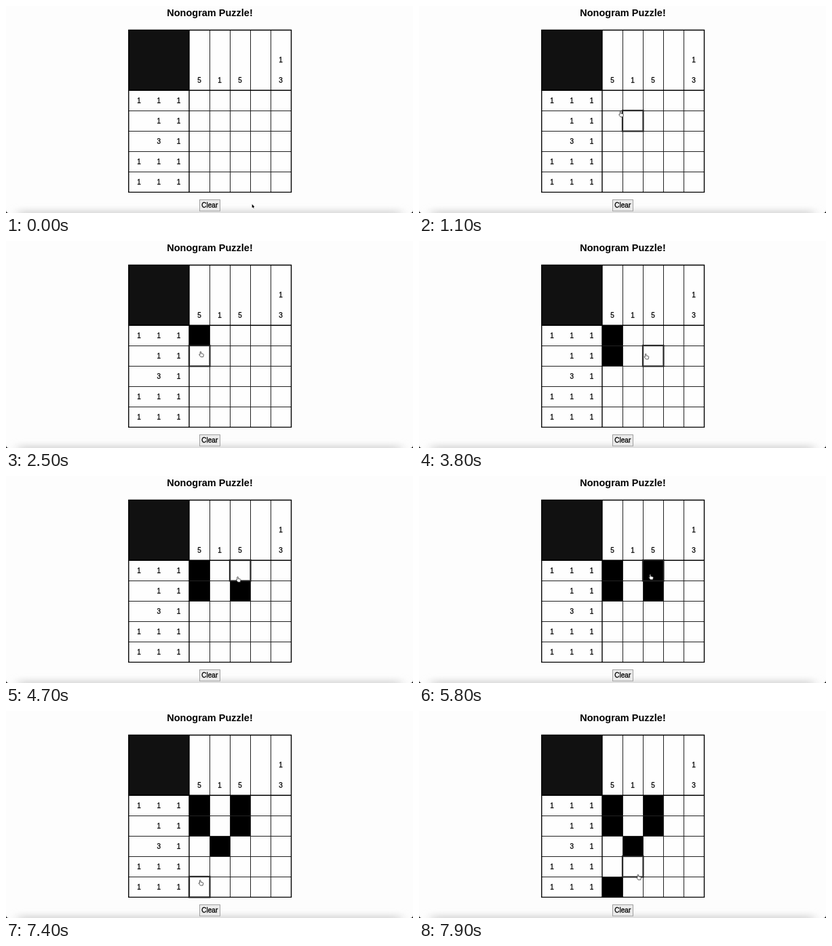
Write an HTML page that moves like this. It is 600 by 305 pixels and loops after 8000 ms.

```html
<!DOCTYPE html>
<html lang="en">
<head>
<meta charset="utf-8">
<title>Nonogram</title>
<style>
  html, body { margin: 0; width: 100%; height: 100%; overflow: hidden; background: #fdfdfd; }
  svg { display: block; }
  text { font: 10px "Liberation Sans", Arial, sans-serif; text-anchor: middle; fill: #000; stroke: #000; stroke-width: .3; }
  .title { font-size: 14.5px; font-weight: bold; stroke: none; }
</style>
</head>
<body>
<svg width="600" height="305" viewBox="0 0 600 305">
  <filter id="blur" x="-10%" y="-100%" width="120%" height="300%"><feGaussianBlur stdDeviation="8 4"/></filter>
  <rect x="18" y="301" width="564" height="30" fill="#d8d8d8" filter="url(#blur)"/>
  <path d="M0 301Q0 305 4 305H0ZM600 301Q600 305 596 305H600Z"/>
  <text class="title" x="300.5" y="14.5">Nonogram Puzzle!</text>
  <rect x="181" y="36" width="239.5" height="238.5" fill="#fefefe"/>
  <rect x="181" y="36" width="89" height="88" fill="#111"/>
  <g id="cells"></g>
  <path id="lines" fill="none" stroke="#222"/>
  <path d="M180.8 35.5H420.5V274.4H180.8ZM270 36V274M181 124.3H420" fill="none" stroke="#000" stroke-width="1.4"/>
  <g id="clues"></g>
  <rect x="285.5" y="285.5" width="30" height="16.5" fill="#ebebeb" stroke="#a0a0a0"/>
  <text x="300.3" y="297.3">Clear</text>
  <g id="hover" fill="none">
    <rect width="30.5" height="30.5" stroke="#000" stroke-opacity=".25" stroke-width="3"/>
    <rect width="30.5" height="30.5" stroke="#222" stroke-width="1.8"/>
  </g>
  <g id="cursor" stroke-linejoin="round">
    <path id="arrow" d="M-1.6 -3V2.2L-.4 1.2L.5 3L1.4 2.6L.6 .9H2.1Z" stroke="#fff" stroke-width=".5" paint-order="stroke"/>
    <path id="hand" d="M-1.9 -3.6q.8 -1 1.6 0V-1.2l2.8 .6q1 .3 .9 1.3L2.7 3.8H-.9L-3.3 .6q0 -1.2 1.4 -.2Z" fill="#fff" stroke="#333" stroke-width=".8"/>
  </g>
</svg>
<script>
const LOOP = 8000, STEP = 100, HOVER_LAG = 60;
const LEFT = 270, TOP = 124, SIZE = 30, COUNT = 5;
const $ = id => document.getElementById(id);

function add(parent, tag, attrs, text = '') {
  const node = document.createElementNS('http://www.w3.org/2000/svg', tag);
  for (const key in attrs) node.setAttribute(key, attrs[key]);
  node.textContent = text;
  return parent.appendChild(node);
}

// Grid and clues
let lines = '';
for (let i = 1; i < COUNT; i++) {
  lines += `M${LEFT + SIZE * i + .5} 36V274M181 ${TOP + SIZE * i + .5}H420`;
}
$('lines').setAttribute('d', lines);

const clue = (x, y, value) => add($('clues'), 'text', { x, y }, value);
['111', ' 11', ' 31', '111', '111'].forEach((row, r) =>
  [...row].forEach((n, i) => clue(196 + 29.3 * i, 143 + SIZE * r, n)));
[...'515 3'].forEach((n, c) => clue(285 + SIZE * c, 112.7, n));
clue(405, 83, 1);

// Pointer moves, each easing out from where the last one ended
const home = { x: 364.3, y: 295 };
const moves = [
  { from: 100, to: 200, x: 372, y: 291 },
  { from: 300, to: 1400, x: 292, y: 149 },
  { from: 2100, to: 2500, x: 288, y: 167 },
  { from: 3400, to: 4100, x: 346, y: 171 },
  { from: 4400, to: 4900, x: 342, y: 149 },
  { from: 5900, to: 6600, x: 303, y: 200 },
  { from: 6900, to: 7600, x: 286, y: 258 },
  { from: 7700, to: 7900, x: 324, y: 245 }
];

function pointerAt(t) {
  let { x, y } = home;
  for (const move of moves) {
    const left = 1 - Math.min(1, Math.max(0, (t - move.from) / (move.to - move.from)));
    const k = 1 - left * left;
    x += (move.x - x) * k;
    y += (move.y - y) * k;
  }
  return { x, y };
}

// The page reacts to the fingertip slightly late
function cellAt(t) {
  const { x, y } = pointerAt(t - HOVER_LAG);
  const c = Math.floor((x - LEFT) / SIZE), r = Math.floor((y - 3 - TOP) / SIZE);
  const inside = Math.min(c, r) >= 0 && Math.max(c, r) < COUNT;
  return { x: LEFT + SIZE * c, y: TOP + SIZE * r, inside };
}

// Each click fills the cell under the pointer
const clicks = [1900, 3500, 4200, 5800, 6800, 7500].map(time => {
  const { x, y } = cellAt(time);
  return { time, node: add($('cells'), 'rect', { x, y, width: SIZE + .5, height: SIZE + .5 }) };
});

const show = (node, on) => node.setAttribute('visibility', on ? 'visible' : 'hidden');
const place = (node, { x, y }) => node.setAttribute('transform', `translate(${x} ${y})`);

function draw(now) {
  const t = Math.floor(now % LOOP / STEP) * STEP;
  const cell = cellAt(t);
  clicks.forEach(({ time, node }) => show(node, t >= time));
  place($('hover'), cell);
  place($('cursor'), pointerAt(t));
  show($('hover'), cell.inside);
  show($('hand'), cell.inside);
  show($('arrow'), !cell.inside);
}

const start = performance.now();
function tick() {
  draw(performance.now() - start);
  requestAnimationFrame(tick);
}
tick();
</script>
</body>
</html>
```
